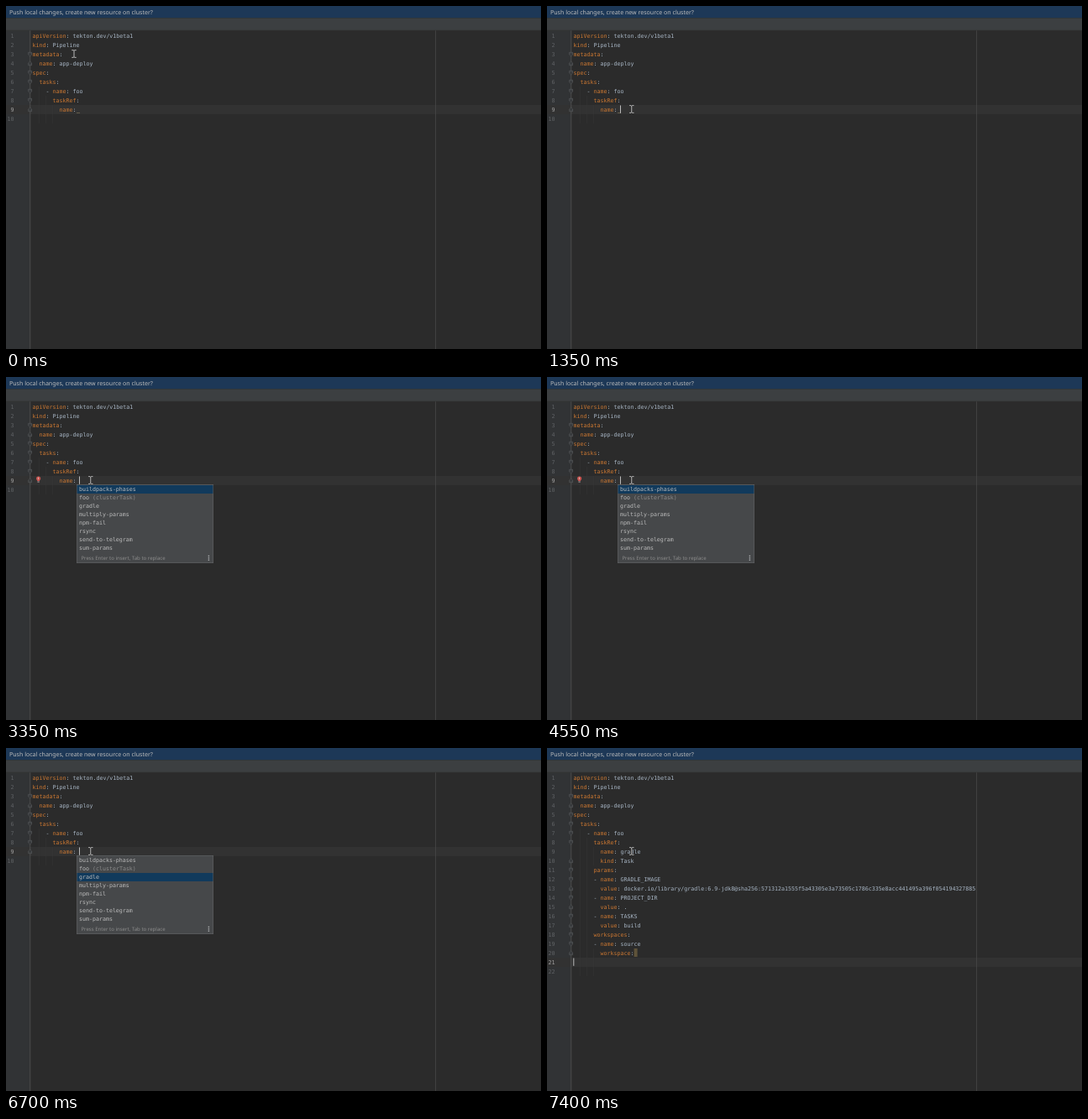
These frames come from a looping animation (637x409 px, 8000 ms). An HTML page:

```html
<!DOCTYPE html>
<html lang="en">
<head>
<meta charset="utf-8">
<title>Pipeline editor</title>
<style>
  html, body { margin: 0; width: 100%; height: 100%; overflow: hidden; background: #2b2b2b; }
  svg { display: block; width: 637px; height: 409px; }
  text { white-space: pre; text-rendering: geometricPrecision; }
  .mono { font: 6.644px "DejaVu Sans Mono", "Liberation Mono", monospace; }
  .ui { font-family: "Noto Sans", "Open Sans", sans-serif; }
</style>
</head>
<body>
<svg id="stage" viewBox="0 0 637 409"></svg>
<script>
const LOOP = 8000, LEFT = 31.5, CHAR = 4, TOP = 30, ROW = 11;
const KEY = '#cc7832', PLAIN = '#a9b7c6';
const stage = document.getElementById('stage');

function add(parent, tag, attrs, content) {
  const el = document.createElementNS('http://www.w3.org/2000/svg', tag);
  for (const k in attrs) el.setAttribute(k, attrs[k]);
  if (content !== undefined) el.textContent = content;
  parent.append(el);
  return el;
}
const group = (parent = stage) => add(parent, 'g', {});
const rect = (parent, x, y, width, height, fill) => add(parent, 'rect', { x, y, width, height, fill });
const path = (parent, d, stroke, width = 1) =>
  add(parent, 'path', { d, stroke, 'stroke-width': width, fill: 'none' });
const mono = (parent, x, y, fill, s) => add(parent, 'text', { x, y, fill, class: 'mono' }, s);
const ui = (parent, x, y, size, fill, s) =>
  add(parent, 'text', { x, y, fill, 'font-size': size, class: 'ui' }, s);
const show = (el, on) => el.setAttribute('visibility', on ? 'visible' : 'hidden');
const rowTop = n => TOP + (n - 1) * ROW;

function codeLine(parent, n, line) {
  const [, indent, dash, key, value] = line.match(/^( *)(- )?(\w+):(.*)$/);
  const y = rowTop(n) + 8;
  let x = LEFT + indent.length * CHAR;
  const put = (s, fill) => { mono(parent, x, y, fill, s); x += s.length * CHAR; };
  if (dash) put(dash, PLAIN);
  put(key, KEY);
  put(':', PLAIN);
  if (value) {
    x += CHAR;
    put(value.trim(), PLAIN);
  }
}

function numbers(parent, count, current) {
  for (let n = 1; n <= count; n++) {
    const s = String(n);
    mono(parent, 9.5 - s.length * CHAR, rowTop(n) + 8, n === current ? '#a4a3a3' : '#606366', s);
  }
}

// Indent guides: [column, first row, last row]
function guides(parent, list) {
  for (const [col, a, b] of list)
    rect(parent, LEFT + col * CHAR, rowTop(a), 0.6, (b - a + 1) * ROW, '#373737');
}

function folds(parent, rows, ends) {
  for (const n of rows) {
    const y = rowTop(n) + 5.5, d = ends.includes(n) ? -1 : 1;
    add(parent, 'path', {
      d: `M26.7 ${y - 2.2 * d}h3.8v${2.8 * d}l-1.9 ${1.8 * d}l-1.9 ${-1.8 * d}z`,
      fill: '#313335', stroke: '#606366', 'stroke-width': 0.6
    });
    path(parent, `M27.6 ${y - 0.6 * d}h2`, '#606366', 0.5);
  }
}

const head = `apiVersion: tekton.dev/v1beta1
kind: Pipeline
metadata:
  name: app-deploy
spec:
  tasks:
    - name: foo
      taskRef:`.split('\n');
const typed = `        name: gradle
        kind: Task
      params:
      - name: GRADLE_IMAGE
        value: docker.io/library/gradle:6.9-jdk8@sha256:571312a1555f5a43305e3a73505c1786c335e8acc441495a396f054194327885
      - name: PROJECT_DIR
        value: .
      - name: TASKS
        value: build
      workspaces:
      - name: source
        workspace:`.split('\n');

// Editor surface
rect(stage, 0, 0, 637, 409, '#2b2b2b');
rect(stage, 0, 29, 28.5, 380, '#313335');
const activeRow = rect(stage, 0, 0, 637, ROW, '#323232');
const before = group(), after = group();
guides(before, [[2, 7, 10], [4, 8, 10], [6, 9, 10]]);
guides(after, [[2, 7, 22], [4, 8, 22], [6, 9, 10], [6, 20, 22]]);
rect(stage, 28.4, 29, 0.8, 380, '#555555');
rect(stage, 511.2, 29, 0.8, 380, '#484848');

// Banner and toolbar
rect(stage, 0, 0, 637, 14.5, '#1d3857');
ui(stage, 4, 9.8, 7.04, '#bbbbbb', 'Push local changes, create new resource on cluster?');
rect(stage, 0, 14.5, 637, 14.5, '#3c3f41');
rect(stage, 0, 14.3, 637, 0.7, '#323537');
rect(stage, 0, 28.6, 637, 0.7, '#323232');

// Code
const mark = rect(stage, 103.6, rowTop(20), 4, 10, '#5f5339');
head.forEach((s, i) => codeLine(stage, i + 1, s));
codeLine(before, 9, '        name:');
typed.forEach((s, i) => codeLine(after, i + 9, s));
numbers(before, 10, 9);
numbers(after, 22, 21);
stage.append(before, after);

const oldFolds = group(), newFolds = group();
folds(oldFolds, [3, 4, 5, 6, 7, 8, 9], [4, 9]);
folds(newFolds, [3, 4, 5, 6, 7, 8, 10, 11, 12, 13, 14, 15, 16, 17, 18, 19, 20], [4, 10, 13, 15, 17, 20]);

const squiggle = path(stage, 'M84 127.2l1 .6l1 -.6l1 .6l1 -.6', '#857a5c', 0.6);
const caret = rect(stage, 87, 118.5, 1, 9.3, '#bbbbbb');

const bulb = group();
add(bulb, 'path', { d: 'M37.2 124c0-1-1.2-1.3-1.2-3a2.6 2.6 0 0 1 5.2 0c0 1.700-1.200 2-1.200 3z', fill: '#c75450' });
rect(bulb, 37.4, 124.4, 2.4, 1.3, '#9a8a8a');
rect(bulb, 38.2, 119.6, 0.8, 2.6, '#e8c4c2');

// Completion list
const popup = group();
rect(popup, 84, 128, 163, 94, '#616365');
rect(popup, 84.6, 128.6, 161.8, 92.8, '#46484a');
const pick = rect(popup, 84.6, 129, 161.8, 10, '#113a5c');
['buildpacks-phases', 'foo', 'gradle', 'multiply-params', 'npm-fail', 'rsync', 'send-to-telegram', 'sum-params']
  .forEach((s, i) => mono(popup, 87, 136.2 + i * 10, '#bbbbbb', s));
mono(popup, 103, 146.2, '#8c8c8c', '(clusterTask)');
ui(popup, 89.4, 217.7, 6.05, '#8c8c8c', 'Press Enter to insert, Tab to replace');
for (const y of [212.7, 215.1, 217.5]) rect(popup, 240.7, y, 1.4, 1.4, '#afb1b3');

// Text pointer, centred on its own zero
const pointer = group();
const beam = 'M-2.700 -4.300H-.8L0 -3.700L.8 -4.300H2.700M0 -3.700V3.700M-2.700 4.300H-.8L0 3.700L.8 4.300H2.700';
path(pointer, beam, '#1c1c1c', 2);
path(pointer, beam, '#dddddd', 0.9);

// Tables of [time, value...]
const track = [[50, 81, 57], [500, 102.5, 128], [650, 102.5, 128], [850, 99, 117], [1000, 99, 117], [1150, 100.8, 123]];
const blinks = [[0, 0], [1350, 1], [2700, 0], [3350, 1], [4000, 0], [4550, 1], [4950, 0], [5500, 1], [6100, 0], [6700, 1]];
const picks = [[0, 0], [4900, 1], [5150, 2]];

const at = (table, t) => table.filter(s => s[0] <= t).pop()[1];
const within = (t, a, b) => t >= a && t < b;

function pointerAt(t) {
  if (t <= track[0][0]) return track[0].slice(1);
  for (let i = 1; i < track.length; i++) {
    const [t0, x0, y0] = track[i - 1], [t1, x1, y1] = track[i];
    if (t < t1) {
      const p = (t - t0) / (t1 - t0), e = p * p * (3 - 2 * p);
      return [x0 + (x1 - x0) * e, y0 + (y1 - y0) * e];
    }
  }
  return track[track.length - 1].slice(1);
}

function draw(t) {
  const done = t >= 6950, open = within(t, 3350, 6900);
  show(before, !done);
  show(after, done);
  show(oldFolds, t < 7350);
  show(newFolds, t >= 7350);
  show(mark, t >= 7400);
  show(squiggle, !done && !open);
  show(bulb, within(t, 2750, 4900));
  show(popup, open);
  show(caret, at(blinks, t));
  pick.setAttribute('y', 129 + at(picks, t) * 10);
  activeRow.setAttribute('y', rowTop(done ? 21 : 9));
  caret.setAttribute('x', done ? 31.3 : 87);
  caret.setAttribute('y', rowTop(done ? 21 : 9) + 0.5);
  // The pointer moves in 50 ms steps
  const [x, y] = pointerAt(Math.floor(t / 50) * 50);
  pointer.setAttribute('transform', `translate(${x} ${y})`);
}

const start = performance.now();
function tick(now) {
  draw(Math.max(0, now - start) % LOOP);
  requestAnimationFrame(tick);
}
draw(0);
requestAnimationFrame(tick);
</script>
</body>
</html>
```
